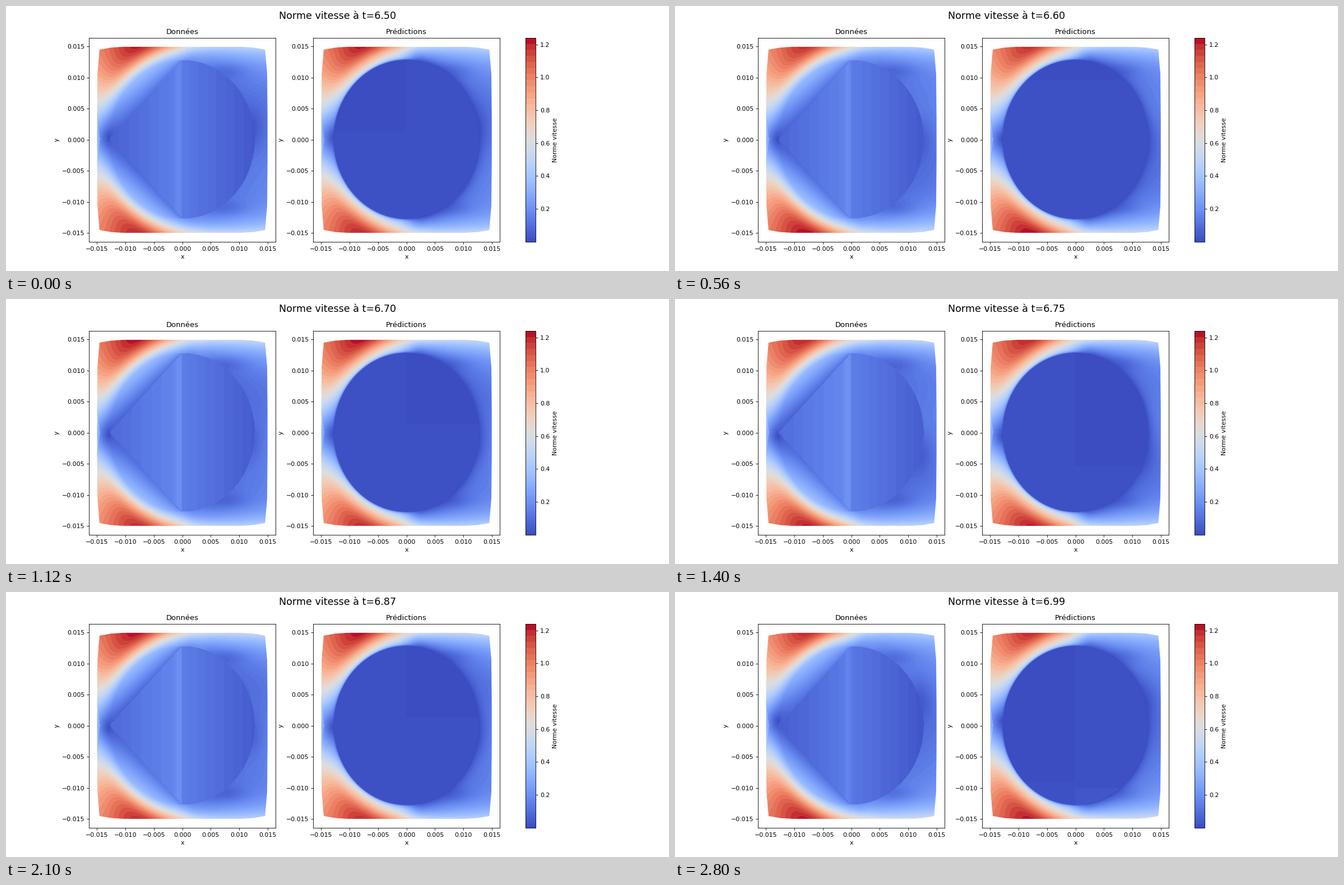
A matplotlib script for the animation above (2.94 s loop, 1183x473 px).

```python
import numpy as np
import matplotlib.pyplot as plt
from matplotlib.animation import FuncAnimation
from matplotlib.cm import ScalarMappable
from matplotlib.colors import ListedColormap, Normalize
from matplotlib.patches import Polygon

DPI = 78.86
FRAMES, INTERVAL = 21, 140
PERIOD = 7.0            # frames per shedding cycle
RADIUS, HALF = 0.0127, 0.015
VMAX, SPEED = 1.24, 0.93


def banded_cmap():
    """Coolwarm in fine steps for low speeds and wider ones for high speeds."""
    edges = np.r_[np.arange(0, 0.8, 0.0125), np.linspace(0.8, VMAX, 13)]
    mids = (edges[:-1] + edges[1:]) / 2
    v = (np.arange(1240) + 0.5) / 1240 * VMAX
    band = np.clip(np.searchsorted(edges, v) - 1, 0, len(mids) - 1)
    return ListedColormap(plt.get_cmap("coolwarm")(mids[band] / VMAX))


def smooth(a, b, v):
    s = np.clip((v - a) / (b - a), 0, 1)
    return s * s * (3 - 2 * s)


def blob(x0, y0, sx, sy):
    return np.exp(-((X - x0) / sx) ** 2 - ((Y - y0) / sy) ** 2)


# Pixel centres in units of the cylinder radius
NX, NY = 304, 333
xs = ((np.arange(NX) + 0.5) / NX * 2 - 1) * HALF / RADIUS
ys = ((np.arange(NY) + 0.5) / NY * 2 - 1) * HALF / RADIUS
X, Y = np.meshgrid(xs, ys)
R = np.hypot(X, Y)
D = np.maximum(R - 1, 0)
AY = np.abs(Y)
SIDE = np.tanh(Y / 0.2)


def potential(x, y):
    z = x + 1j * y
    return SPEED * np.abs(1 - 1 / z ** 2)


def front_flow(c, lift, sharp):
    """Potential flow damped by a boundary layer that thickens downstream."""
    a = 0.05 * c
    x, y = X * np.cos(a) + Y * np.sin(a), Y * np.cos(a) - X * np.sin(a)
    scale = np.maximum(R, 1) / np.maximum(R, 1e-6)
    phi = np.arctan2(np.abs(y), -x)
    k = np.clip(1.5 - 0.65 * phi, 0.1, 1.5)
    s = 0.293 + 2.5 * D + 9 * D ** 2
    if sharp:
        s = (s + 0.15 * np.exp(-D / 0.1)) * (1 - np.exp(-D / 0.018))
    v = potential(x * scale, y * scale) * np.tanh(k * s)
    v = v * (1 + 0.018 * lift * SIDE)
    wedge = X < -1.18 + 0.045 * (1 - AY / 0.27)
    return v + 0.1 * wedge


def wake_flow(c, phase, sharp):
    top = (0.4 + 0.3 * np.exp(-np.maximum(X, 0) / 0.25)) * (1 + 0.13 * c * SIDE)
    shear = top * np.exp(-(1.18 - AY) / (0.13 + 0.05 * np.maximum(X, 0)))
    base = 0.07 + 0.08 * np.clip(X - 0.4, 0, 1)
    base = base + 0.02 * np.cos(4 * Y - phase)
    base = base - 0.07 * blob(0.95, -0.32 * c, 0.16, 0.25)
    for sign in (1, -1):
        base = base - 0.06 * blob(0.62, sign * 0.87, 0.28, 0.1)
    base = np.maximum(base, 0.015) * smooth(-0.1, 0.3, X)
    v = shear + base
    if sharp:
        v = v * (1 - np.exp(-D / 0.06))
    return v


def outer_flow(c, lift, phase, sharp):
    mix = smooth(-0.12, 0.25, X)
    return (1 - mix) * front_flow(c, lift, sharp) + mix * wake_flow(c, phase, sharp)


def data_field(c, lift, phase):
    v = outer_flow(c, lift, phase, False)
    # Straight-sided interpolation across the cylinder
    chord_r = R / np.maximum(np.abs(X) + AY, 1e-6)
    q = np.clip((R - chord_r) / (1 - chord_r + 0.01), 0, 1)
    chord = 0.06 + 0.08 * (X + 1) - 0.02 * c * SIDE
    sliver = chord + (v - chord) * q
    ridge = 0.03 * np.clip(1 - np.abs(X + 0.05) / 0.07, 0, 1)
    left = 0.075 + 0.09 * (X + 1) + 0.025 * c + ridge
    right = 0.14 - 0.1 * X + 0.012 * c
    inside = np.where(X < 0, np.where(AY - X < 1, left, sliver), right)
    return np.where(R < 1, inside, v)


def predicted_field(c, lift, phase):
    v = outer_flow(c, lift, phase, True)
    inside = 0.016 + 0.006 * c * np.where(X < 0, 1, -1) - 0.004 * Y
    return np.where(R < 1, inside, v)


def outline():
    quad = np.array([(0.01499, 0.0035), (0.01492, 0.0106), (0.01456, 0.0145),
                     (0.0125, 0.01483), (0.0104, 0.01495)])
    flip = quad[::-1]
    return np.vstack([quad, flip * (-1, 1), quad * (-1, -1), flip * (1, -1)])


fig, axes = plt.subplots(1, 2, figsize=(1183.01 / DPI, 473.01 / DPI), dpi=DPI)
cmap, norm = banded_cmap(), Normalize(0, VMAX)
ticks = np.arange(-3, 4) * 0.005
images = []
for ax, name in zip(axes, ("Données", "Prédictions")):
    im = ax.imshow(np.zeros((NY, NX)), cmap=cmap, norm=norm, origin="lower",
                   extent=(-HALF, HALF, -HALF, HALF), aspect="auto",
                   interpolation="nearest")
    im.set_clip_path(Polygon(outline(), closed=True, transform=ax.transData))
    ax.set(xlim=(-0.01643, 0.01643), ylim=(-0.0164, 0.0164),
           xticks=ticks, yticks=ticks, xlabel="x", ylabel="y", title=name)
    ax.xaxis.set_major_formatter(lambda v, _: f"{v:.3f}".replace("-", "−"))
    ax.yaxis.set_major_formatter(lambda v, _: f"{v:.3f}".replace("-", "−"))
    images.append(im)

fig.colorbar(ScalarMappable(norm, cmap), ax=axes, label="Norme vitesse",
             ticks=np.arange(1, 7) * 0.2, format="%.1f")
heading = fig.suptitle("", fontsize=16)


def update(i):
    phase = 2 * np.pi * (i - 2.25) / PERIOD
    c = np.cos(phase)
    lift = np.cos(2 * np.pi * (i - 0.2) / PERIOD)
    images[0].set_data(data_field(c, lift, phase))
    images[1].set_data(predicted_field(c, lift, phase))
    heading.set_text(f"Norme vitesse à t={6.5 + 0.0246 * i:.2f}")
    return [*images, heading]


anim = FuncAnimation(fig, update, frames=FRAMES, interval=INTERVAL,
                     repeat=True, repeat_delay=0, blit=False)
plt.show()
```
